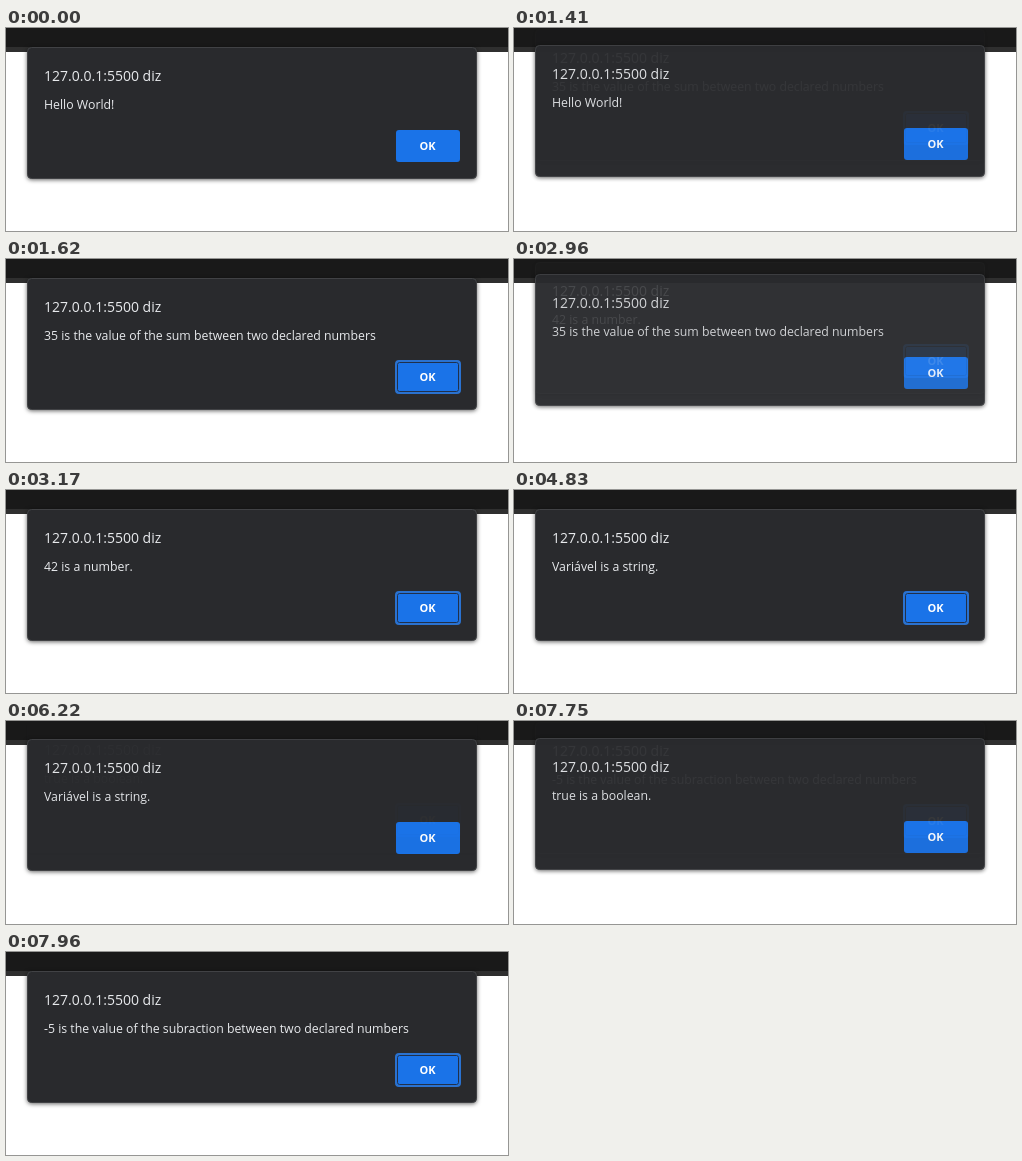
Animation, 502 px wide and 203 px high, one loop 8000 ms. Source, as an HTML page:

```html
<!DOCTYPE html>
<html lang="en">
<head>
<meta charset="utf-8">
<title>Alert dialogs</title>
<style>
  html, body { margin: 0; width: 100%; height: 100%; overflow: hidden; background: #fff; }
  svg { display: block; width: 502px; height: 203px; }
  text { font-family: "Open Sans", "Noto Sans", sans-serif; fill: #e8eaed; white-space: pre; }
  .title { font-size: 14px; }
  .message { font-size: 12.3px; }
  .ok { font-size: 11px; font-weight: 700; fill: #fff; text-anchor: middle; }
  .box { fill: #292a2d; stroke: #414245; filter: drop-shadow(0 1px 2px rgba(0, 0, 0, .6)); }
</style>
</head>
<body>
<svg viewBox="0 0 502 203">
  <rect width="502" height="19" fill="#191919"/>
  <rect y="19" width="502" height="5" fill="#2f2f2f"/>
  <g id="old"></g>
  <g id="new"></g>
  <path id="cursor" d="M0 0V16L3.7 12.6L6.3 18.5L8.8 17.4L6.2 11.6H11.4Z" fill="#fff" stroke="#000"/>
</svg>
<script>
const LOOP = 8000, STEP = 70, SLIDE = 200, RISE = 20;

// start: when the dialog replaces the one before; lead: slide time already spent by then
const dialogs = [
  { start: 0, lead: SLIDE, text: "Hello World!" },
  { start: 1410, lead: 20, text: "35 is the value of the sum between two declared numbers" },
  { start: 2960, lead: 40, text: "42 is a number." },
  { start: 4620, lead: 0, text: "Variável is a string." },
  { start: 6220, lead: 10, text: "true is a boolean." },
  { start: 7750, lead: 20, text: "-5 is the value of the subraction between two declared numbers" }
];

const byId = id => document.getElementById(id);

function makeDialog(id) {
  const group = byId(id);
  group.innerHTML = `
    <rect class="box" x="21.5" y="19.5" width="449" height="131" rx="4"/>
    <text class="title" x="38" y="53">127.0.0.1:5500 diz</text>
    <text class="message" x="38" y="81"></text>
    <rect x="390" y="102" width="64" height="32" rx="3" fill="#1a73e8"/>
    <g class="ring" fill="none">
      <rect x="391.5" y="103.5" width="61" height="29" rx="2" stroke="#20304a"/>
      <rect x="390" y="102" width="64" height="32" rx="3" stroke="#2a72d0" stroke-width="2"/>
    </g>
    <text class="ok" x="421.5" y="122">OK</text>`;
  const message = group.querySelector(".message");
  const ring = group.querySelector(".ring");
  return (text, y, opacity, focused) => {
    if (message.textContent !== text) message.textContent = text;
    group.setAttribute("transform", `translate(0 ${y})`);
    group.setAttribute("opacity", opacity);
    ring.setAttribute("visibility", focused ? "inherit" : "hidden");
  };
}

const drawOld = makeDialog("old"), drawNew = makeDialog("new");

function drawCursor(t) {
  const k = Math.floor((t - 130) / 69);
  const shown = k >= 0 && k < 9;
  const arc = Math.sin(Math.PI * (k + 1) / 10);
  byId("cursor").setAttribute("visibility", shown ? "visible" : "hidden");
  byId("cursor").setAttribute("transform", `translate(${300 - 51 * arc} ${203 - 147 * arc})`);
}

function draw(t) {
  const i = dialogs.findLastIndex(d => t >= d.start);
  const { start, lead, text } = dialogs[i];
  const age = t - start;
  const spent = lead + Math.floor(age / STEP) * STEP;
  const p = age >= 3 * STEP ? 1 : Math.min(1, spent / SLIDE);

  drawNew(text, Math.round(RISE * (p - 1)), p ** 1.3, i > 0 || t >= 406);
  if (i > 0 && p < 1) drawOld(dialogs[i - 1].text, Math.round(-RISE * p), 1 - p * p, false);
  else drawOld("", 0, 0, false);
  drawCursor(t);
}

const begin = performance.now();
function tick() {
  draw((performance.now() - begin) % LOOP);
  requestAnimationFrame(tick);
}
tick();
</script>
</body>
</html>
```
